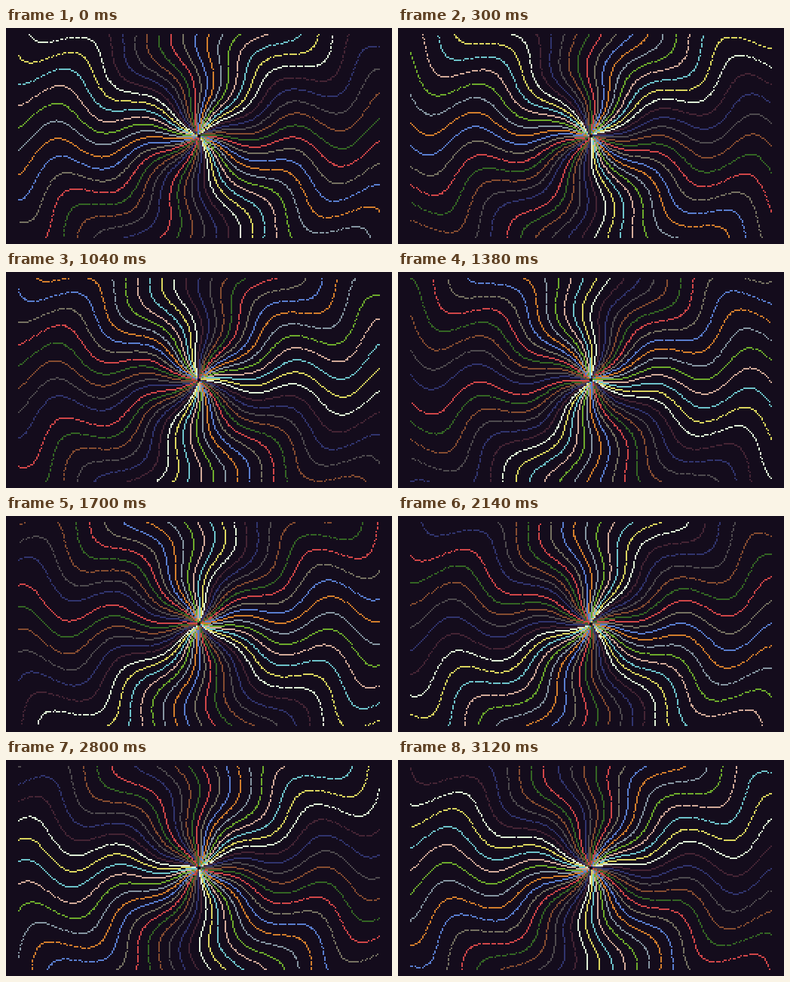
These frames come from a looping animation (512 by 288 pixels, 3.14 s). An HTML page with a canvas:

```html
<!DOCTYPE html>
<html lang="en">
<head>
<meta charset="utf-8">
<title>Wavy rays</title>
<style>
  html, body { margin: 0; width: 100%; height: 100%; overflow: hidden; background: #140c1c; }
  canvas { display: block; width: 512px; height: 288px; }
</style>
</head>
<body>
<canvas id="stage" width="512" height="288"></canvas>
<script>
const ctx = document.getElementById('stage').getContext('2d');
const palette = [
  '#140c1c', '#442434', '#30346d', '#4e4a4e', '#854c30', '#346524', '#d04648', '#757161',
  '#597dce', '#d27d2c', '#8595a1', '#6daa2c', '#d2aa99', '#6dc2ca', '#dad45e', '#deeed6'
];
const LOOP = 3140, STEP = 20;
const SCALE = 2, WIDTH = 240, HEIGHT = 136, LEFT = 8, TOP = 4;
const RAYS = 50, INNER = 2, OUTER = 145;
const START = 16.18, LEAD = 1.1, SPEED = 0.006;

function dot(x, y) {
  if (x < 0 || y < 0 || x >= WIDTH || y >= HEIGHT) return;
  ctx.fillRect((x + LEFT) * SCALE, (y + TOP) * SCALE, SCALE, SCALE);
}

// Every ray shares one radial ripple while the whole fan turns.
function draw(ms) {
  const t = START + ms * SPEED;
  ctx.fillStyle = palette[0];
  ctx.fillRect(0, 0, 512, 288);
  for (let i = 1; i <= RAYS; i++) {
    ctx.fillStyle = palette[i % 15 + 1];
    for (let r = INNER; r <= OUTER; r++) {
      const a = (i + t) / 8 + Math.sin(r / 10 + t + LEAD) / 10;
      dot(Math.floor(WIDTH / 2 + r * Math.cos(a)), Math.floor(HEIGHT / 2 + r * Math.sin(a)));
    }
  }
}

const begin = performance.now();
function tick() {
  const ms = (performance.now() - begin) % LOOP;
  draw(Math.floor(ms / STEP) * STEP);
  requestAnimationFrame(tick);
}
tick();
</script>
</body>
</html>
```
